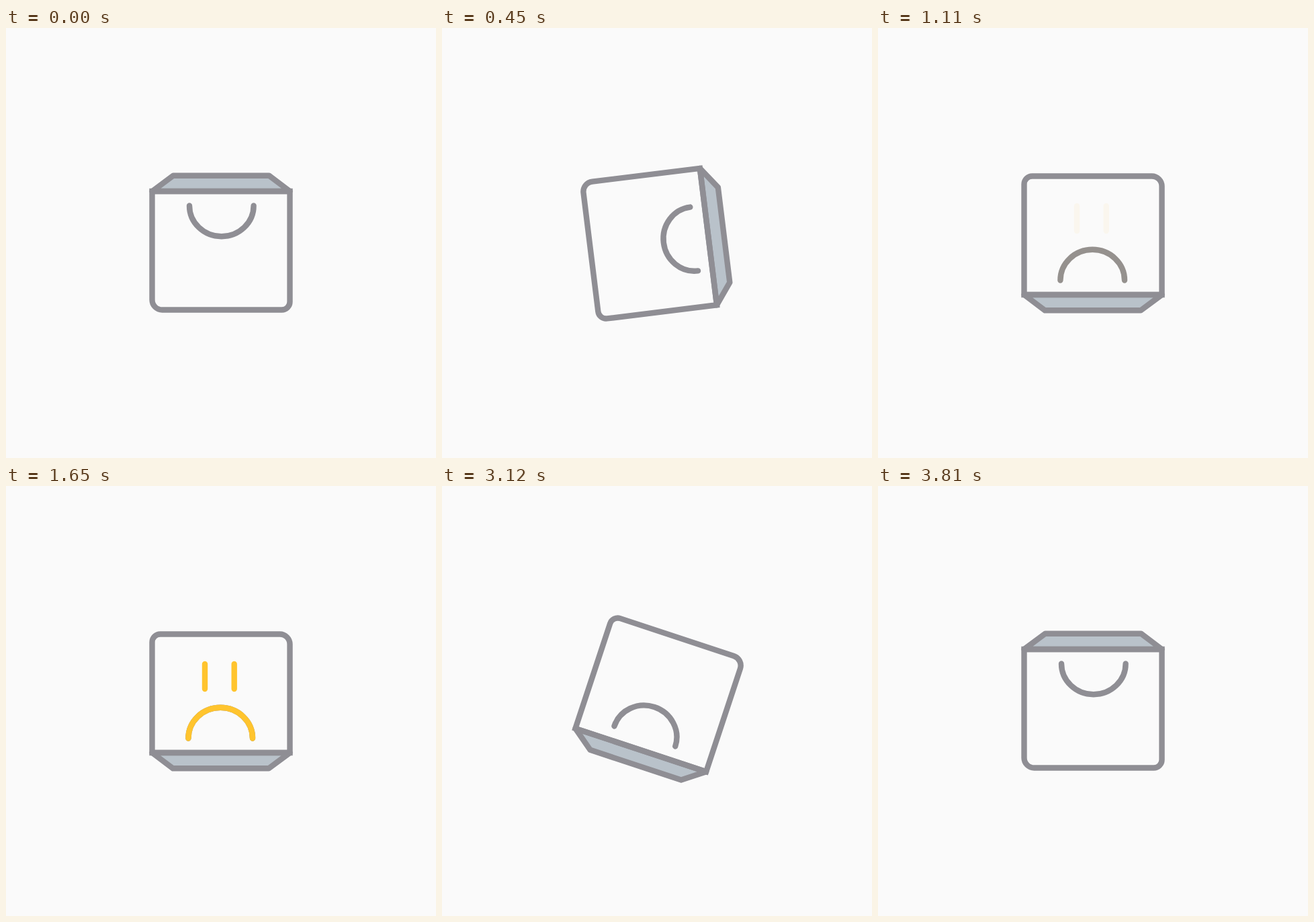
An HTML page for the animation above (4530 ms loop, 640 by 640 pixels).

```html
<!DOCTYPE html>
<html lang="en">
<head>
<meta charset="utf-8">
<title>Bag turning into a sad face</title>
<style>
  html, body { margin: 0; width: 100%; height: 100%; overflow: hidden; background: #fafafa; }
  svg { display: block; width: 100vw; height: 100vh; }
  #bag { fill: none; stroke: #8f8e94; stroke-width: 8.4; }
  #face { stroke: #ffc42e; }
  .lip { fill: #b9c2ca; stroke-linejoin: round; }
  .round { stroke-linecap: round; }
</style>
</head>
<body>
<svg viewBox="0 0 640 640">
  <defs><path id="curve" d="M273 264.5A47.8 45.7 0 0 0 368.6 264.5"/></defs>
  <g id="bag">
    <path class="lip" d="M217.5 243L249 219.7H391.5L422.5 243Z"/>
    <path d="M217.5 243H422.5V407.5A12 12 0 0 1 410.5 419.5H232.5A15 15 0 0 1 217.5 404.5Z"/>
    <use href="#curve" class="round"/>
    <g id="face" class="round">
      <use href="#curve"/>
      <path d="M344 375V338M300.3 375V338"/>
    </g>
  </g>
</svg>
<script>
const LOOP = 4530, TURN_BACK = 2910;
const bag = document.getElementById('bag');
const face = document.getElementById('face');

// Half turn with wind-up and overshoot: [ms, degrees, degrees per ms]
const turnKeys = [
  [0, 0, 0], [210, -18.3, 0], [450, 82.5, 0.46],
  [690, 173.6, 0.28], [750, 185.5, 0.02], [900, 180, 0]
];

const clamp = x => Math.min(1, Math.max(0, x));
const ramp = (t, from, to) => clamp((t - from) / (to - from));

function turn(t) {
  if (t <= 0) return 0;
  if (t >= 900) return 180;
  const i = turnKeys.findIndex(key => key[0] > t);
  const [t0, a, va] = turnKeys[i - 1], [t1, b, vb] = turnKeys[i];
  const span = t1 - t0, u = (t - t0) / span, v = 1 - u;
  return a * v * v * (1 + 2 * u) + b * u * u * (1 + 2 * v)
    + span * u * v * (va * v - vb * u);
}

function draw(t) {
  const angle = turn(t) - turn(t - TURN_BACK);
  bag.setAttribute('transform', `rotate(${angle} 320 320)`);
  face.setAttribute('opacity', ramp(t, 1080, 1650) - ramp(t, 2580, 2910));
}

const start = performance.now();
function tick() {
  draw((performance.now() - start) % LOOP);
  requestAnimationFrame(tick);
}
tick();
</script>
</body>
</html>
```
